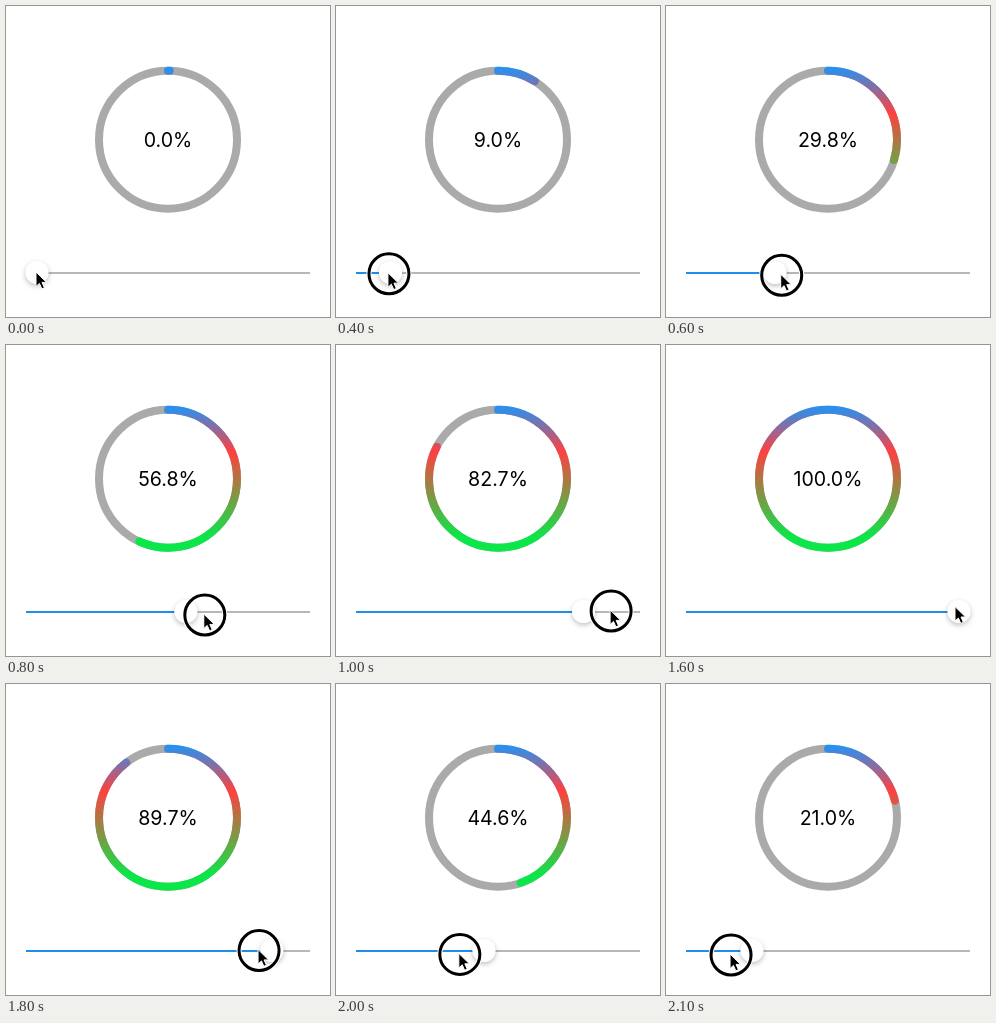
Write an HTML page that moves like this. It is 324 px wide and 311 px high and loops after 2.2 s.

```html
<!DOCTYPE html>
<html lang="en">
<head>
<meta charset="utf-8">
<title>Progress ring and slider</title>
<style>
html, body { margin: 0; width: 100%; height: 100%; overflow: hidden; background: #fff; }
svg { display: block; }
text { font: 19.6px Inter, Roboto, sans-serif; text-anchor: middle; }
#thumb { filter: drop-shadow(0 2px 2.5px rgba(0, 0, 0, .25)); }
</style>
</head>
<body>
<svg width="324" height="311" viewBox="0 0 324 311" fill="none">
  <defs>
    <linearGradient id="hues" gradientUnits="userSpaceOnUse" x1="0" y1="62" x2="0" y2="206">
      <stop offset="0" stop-color="#2492f4"/>
      <stop offset=".31" stop-color="#ff4040"/>
      <stop offset=".9" stop-color="#0be648"/>
    </linearGradient>
  </defs>
  <circle cx="162" cy="133.7" r="69" stroke="#aaa" stroke-width="8"/>
  <path id="arc" d="M162 64.7a69 69 0 0 1 0 138a69 69 0 0 1 0-138" pathLength="100"
    stroke="url(#hues)" stroke-width="8" stroke-linecap="round"/>
  <text id="label" x="162" y="141" fill="#000"></text>
  <path d="M20 267H304" stroke="#b7b7b7" stroke-width="2"/>
  <path id="filled" stroke="#1f8eea" stroke-width="2"/>
  <circle id="thumb" cy="266.5" r="11.6" fill="#fff"/>
  <g id="pointer">
    <g id="press">
      <circle cx="1" cy="1" r="20" stroke="#fff" stroke-width="5"/>
      <circle cx="1" cy="1" r="20" stroke="#000" stroke-width="3"/>
    </g>
    <path d="M0 0V14.5L3.4 11.4L5.8 16.8L8.4 15.7L6 10.4H10.6Z" fill="#000" stroke="#fff"/>
  </g>
</svg>
<script>
const LOOP = 2200, STEP = 100;
const $ = id => document.getElementById(id);

// Sine ease from 0 to 1, held outside its span
function ease(t, start, duration) {
  const k = Math.min(1, Math.max(0, (t - start) / duration));
  return (1 - Math.cos(Math.PI * k)) / 2;
}

function draw(now) {
  const t = Math.floor(now % LOOP / STEP) * STEP;
  // The drag to the right overshoots the end of the track
  const p = Math.min(1, 1.05 * ease(t, 176, 1186)) - ease(t, 1672, 614);
  const x = 30 + 294 * ease(t, 209, 1084) - 35 * ease(t, 1300, 300) - 259 * ease(t, 1657, 580);
  const y = 266 + 3 * ease(t, 200, 600) - 8 * ease(t, 800, 400) + 9 * ease(t, 1500, 600);
  const pressed = t >= 100 && t < 1400 || t >= 1700;
  const thumbX = 31 + 262 * p;

  $('arc').setAttribute('stroke-dasharray', `${Math.max(p * 100, .4)} 200`);
  $('label').textContent = (p * 100).toFixed(1) + '%';
  $('filled').setAttribute('d', `M20 267H${thumbX}`);
  $('thumb').setAttribute('cx', thumbX);
  $('pointer').setAttribute('transform', `translate(${x} ${y})`);
  $('press').style.display = pressed ? '' : 'none';
}

const start = performance.now();
function tick() {
  draw(performance.now() - start);
  requestAnimationFrame(tick);
}
tick();
</script>
</body>
</html>
```
